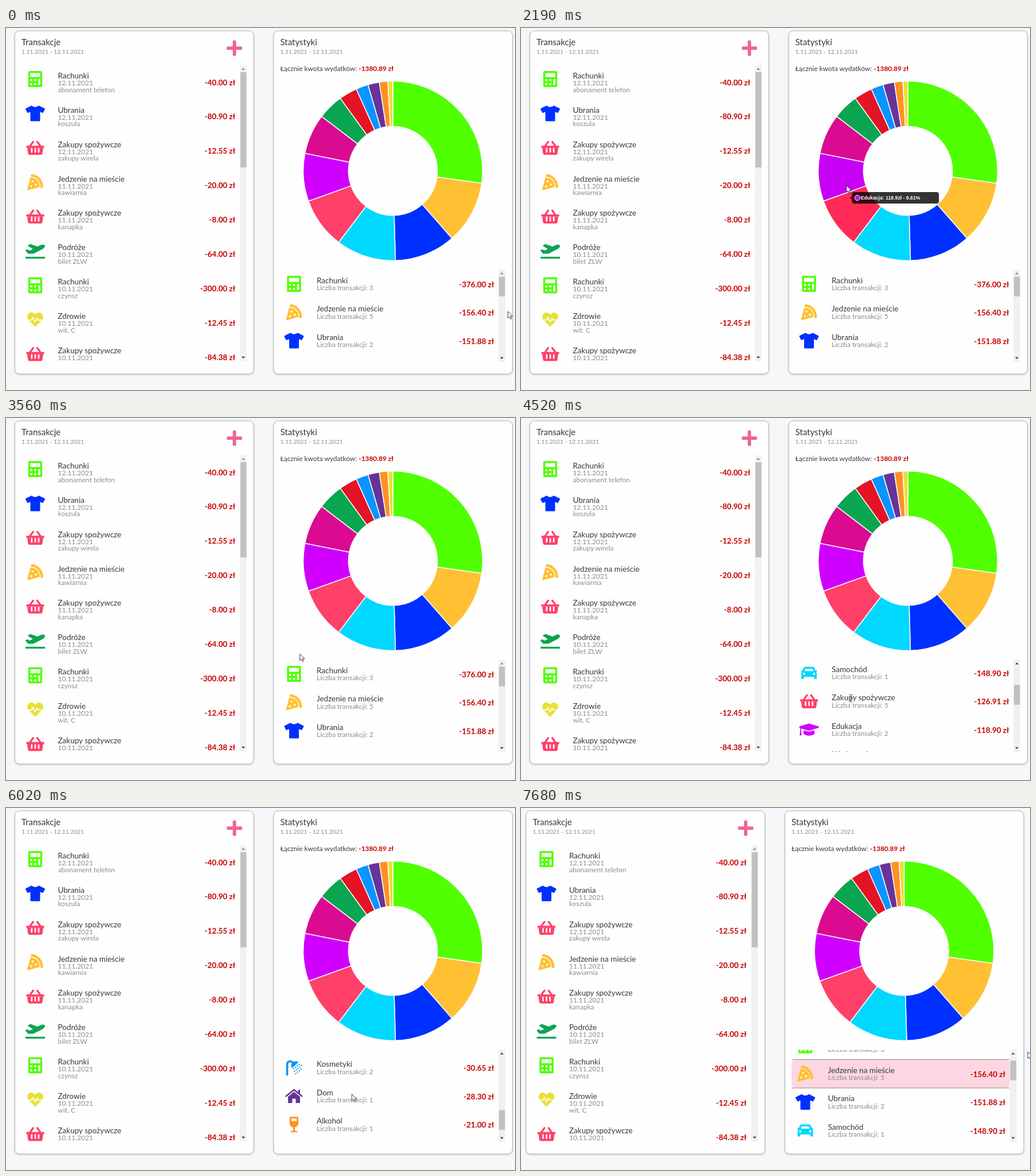
Recreate the animation shown at these times as an HTML page. Size 888 by 631 pixels, loop 8 s.

```html
<!DOCTYPE html>
<html lang="pl">
<head>
<meta charset="utf-8">
<title>Wydatki</title>
<style>
html, body { margin: 0; width: 100%; height: 100%; overflow: hidden; background: #f6f7f9; }
svg { display: block; font-family: Lato, sans-serif; }
.panel { fill: #fefefe; stroke: #b9b9b9; filter: drop-shadow(0 1px 1.5px rgba(0,0,0,.22)); }
.title { font-size: 15px; fill: #2f3a45; }
.range { font-size: 10.4px; fill: #8c8c8c; }
.name { font-size: 13.5px; fill: #2f3a45; }
.note { font-size: 12px; fill: #8c8c8c; }
.sum { font-size: 11.9px; fill: #2f3a45; }
.money { font-weight: 700; fill: #c80000; }
.amount { font-size: 13.5px; text-anchor: end; }
.tip { font: bold 8.7px "Liberation Sans", Arial, sans-serif; fill: #fff; }
.hole { fill: #fefefe; }
.cut { fill: none; stroke: #fefefe; }
.bar { fill: none; stroke: currentColor; stroke-linecap: round; }
</style>
</head>
<body>
<svg id="stage" width="888" height="631" viewBox="0 0 888 631"></svg>
<script>
// Icons are centred on 0,0 and take the colour of their category.
const icons = {
  bill: `<rect x="-12.2" y="-14" width="24.4" height="28" rx="2.6"/>
    <path class="hole" d="M-8.7-10.5H8.7V-3.5H-8.7ZM-8.7 0h3.5v3.5h-3.5ZM-1.7 0h3.5v3.5h-3.5ZM5.2 0h3.5v10.5h-3.5ZM-8.7 7h3.5v3.5h-3.5ZM-1.7 7h3.5v3.5h-3.5Z"/>`,
  pizza: `<path d="M-8.1-9.6L-7.3-12.7Q-6.8-14-5.3-14C4.6-13 12.9-5 14 7.7Q14 9.2 12.7 9.7L9.6 10.5C9.1-2.4 2.2-9.3-8.1-9.6Z"/>
    <path d="M-8.5-7.9C1.2-7.8 7.7-1.4 7.9 8.2L-12.9 14Q-14.2 14-14 12.9Z"/>
    <g class="hole"><circle cx="-7" cy="7" r="1.8"/><circle cx="-4.4" cy="-1.3" r="1.8"/><circle cx="1.3" cy="4.4" r="1.8"/></g>`,
  shirt: `<path d="M-6.2-13.7C-3-10.4 3-10.4 6.2-13.7L16.6-8.6Q17.2-8 17-7.3L13.9-1.3Q13.3-.7 12.6-1L9.6-2.4Q8.6-2.6 8.5-1.6V12Q8.5 13.6 6.9 13.6H-6.9Q-8.5 13.6-8.5 12V-1.6Q-8.6-2.6-9.6-2.4L-12.6-1Q-13.3-.7-13.9-1.3L-17-7.3Q-17.2-8-16.6-8.6Z"/>`,
  car: `<path d="M-9.5-8.5Q-9-10.5-7-10.5H7Q9-10.5 9.5-8.5L11-4.5H13.5V-2L12.3-1.5Q13.5 0 13.5 1.5V10.5H8.7V7H-8.7V10.5H-13.5V1.5Q-13.5 0-12.3-1.5L-13.5-2V-4.5H-11Z"/>
    <path class="hole" d="M-6.3-7H6.3L7.6-3H-7.6Z"/><g class="hole"><circle cx="-8.7" cy="1.7" r="2"/><circle cx="8.7" cy="1.7" r="2"/></g>`,
  basket: `<rect x="-15.7" y="-3.5" width="31.4" height="3.5" rx="1.3"/>
    <path d="M-14-.2H14L12.6 10Q12 12.2 10 12.2H-10Q-12 12.2-12.6 10Z"/>
    <path class="bar" stroke-width="3.3" d="M-9-3L-3.6-10.4M9-3L3.6-10.4"/>
    <path class="cut" stroke-width="2.6" stroke-linecap="round" d="M-6.1 1.5V7.3M0 1.5V7.3M6.1 1.5V7.3"/>`,
  cap: `<path d="M0-10.6L16.5-5.7Q18-4.4 16.5-3.1L1.5 1.6Q0 2-1.5 1.6L-13.7-2V3.5L-12.7 10H-16.5L-15.4 3.5V-2.8L-16.5-3.1Q-18-4.4-16.5-5.7Z"/>
    <path d="M-9 1L-1.5 3.4Q0 3.8 1.5 3.4L9 1L9.8 7C6 11.6-6 11.6-9.8 7Z"/>`,
  ticket: `<path d="M-15-9H15V-3A3 3 0 0 0 15 3V9H-15V3A3 3 0 0 0-15-3Z"/><path class="cut" stroke-width="2" d="M-9-5H9V5H-9Z"/>`,
  plane: `<rect x="-17" y="10.2" width="34" height="3.4" rx=".8"/>
    <path d="M-12.8 4.5Q-12.2 5.1-11.5 5.1H-4.5Q-3.6 5.1-2.9 4.7L12.6-3.1Q15-4.4 16.2-6.2Q17.4-8.3 16.9-9.6Q16.2-11 13.8-11.1Q11.5-11.2 9.1-10.1L3.9-7.4L-7.8-11.8Q-8.3-12-8.7-11.8L-12.2-10Q-13.2-9.4-12.5-8.5L-4.2-3.3L-9.7-.5L-13.5-2.5Q-14-2.7-14.4-2.5L-16.5-1.4Q-17.4-.8-16.8 .1Z"/>`,
  film: `<rect x="-14" y="-11" width="28" height="22" rx="2.5"/><path class="hole" d="M-7-8H7V-1.5H-7ZM-7 1.5H7V8H-7Z"/>`,
  shower: `<path class="bar" stroke-width="3.6" stroke-linecap="butt" d="M-12 12V-6C-12-12-5-12.5-2-8.5"/>
    <path d="M-4.5-1C-7-8 0-13 6.5-10.5L7.5-9.3L-3.2 .6Z"/>
    <path class="bar" stroke-width="2.2" stroke-dasharray=".1 3.9" d="M-.5 2L10-7M1 6.5L14-5M3 10.5L14.5 .5"/>`,
  house: `<path class="bar" stroke-width="2.6" d="M-13.7 .2L0-11L13.7 .2"/><path d="M-10.5 1L0-7.5L10.5 1V12H3V4.5H-3V12H-10.5ZM7-11h3.5v7L7-7Z"/>`,
  glass: `<path d="M-7-13.5H7L7.8-3C7.8 2 4.5 4.2 1.6 4.8V11H4.5Q6 11 6 13.5H-6Q-6 11-4.5 11H-1.6V4.8C-4.5 4.2-7.8 2-7.8-3Z"/><path class="hole" d="M-4.4-10.5H4.4L4.7-6H-4.7Z"/>`,
  heart: `<path d="M0 12.3Q-.5 12.3-1 11.8L-12 .5C-14.6-3-14.4-7.2-12-9.9C-8.9-13-4.6-13-1.5-10.1L0-8.5L1.5-10.1C4.6-13 8.9-13 12-9.9C14.4-7.2 14.6-3 12 .5L1 11.8Q.5 12.3 0 12.3Z"/>
    <path class="cut" stroke-width="1.8" stroke-linejoin="round" d="M-14 .9H-6.1L-3.9-4L0 4L3.5-2.6L5.3 .9H14"/>`
};

// name, colour, icon, total, number of transactions, hover colour
const categories = [
  ['Rachunki', '#50ff00', 'bill', 376, 3],
  ['Jedzenie na mieście', '#ffc033', 'pizza', 156.4, 5],
  ['Ubrania', '#0030ff', 'shirt', 151.88, 2, '#002be6'],
  ['Samochód', '#00d8ff', 'car', 148.9, 1, '#00c2e6'],
  ['Zakupy spożywcze', '#ff4068', 'basket', 126.91, 5, '#ff1f4d'],
  ['Edukacja', '#d000ff', 'cap', 118.9, 2, '#bb00e6'],
  ['Wydarzenia', '#da0a91', 'ticket', 100, 1, '#c4007f'],
  ['Podróże', '#0aa550', 'plane', 64, 1],
  ['Rozrywka', '#e31425', 'film', 45.5, 1],
  ['Kosmetyki', '#0a94ff', 'shower', 30.65, 2],
  ['Dom', '#673399', 'house', 28.3, 1],
  ['Alkohol', '#ff9124', 'glass', 21, 1],
  ['Zdrowie', '#e8e037', 'heart', 12.45, 1]
];
const total = 1380.89;

// category, day, note, amount
const transactions = [
  [0, 12, 'abonament telefon', 40], [2, 12, 'koszula', 80.9], [4, 12, 'zakupy wirela', 12.55],
  [1, 11, 'kawiarnia', 20], [4, 11, 'kanapka', 8], [7, 10, 'bilet ZLW', 64],
  [0, 10, 'czynsz', 300], [12, 10, 'wit. C', 12.45], [4, 10, '', 84.38]
];

const text = (cls, x, y, s) => `<text class="${cls}" x="${x}" y="${y}">${s}</text>`;
const money = v => `-${v.toFixed(2)} zł`;
const amount = (x, y, v) => text('money amount', x, y, money(v));
const icon = (cat, x, y) =>
  `<g transform="translate(${x} ${y})" fill="${cat[1]}" color="${cat[1]}">${icons[cat[2]]}</g>`;

const panel = (x, title) => `<rect class="panel" x="${x + .5}" y="5" width="416.5" height="598" rx="8"/>
  ${text('title', x + 12, 30, title)}${text('range', x + 12, 44.5, '1.11.2021 - 12.11.2021')}`;

const scrollbar = (id, x, y, h, thumb) => `<rect x="${x}" y="${y}" width="12" height="${h}" fill="#f1f1f1"/>
  <path id="${id}Up" d="M${x + 3} ${y + 8}l3-3.4l3 3.4Z" fill="#8a8a8a"/>
  <path d="M${x + 3} ${y + h - 8.2}l3 3.4l3-3.4Z" fill="#404040"/>
  <rect id="${id}Thumb" x="${x + 1}" y="${y + 12}" width="10.5" height="${thumb}" fill="#c1c1c1"/>`;

const transactionRow = ([c, day, note, value], i) => {
  const y = 59.9 * i;
  return icon(categories[c], 51, 89 + y) + text('name', 90.5, 87.8 + y, categories[c][0]) +
    text('note', 90.5, 99.8 + y, `${day}.11.2021`) + text('note', 90.5, 111.5 + y, note) + amount(400, 99.5 + y, value);
};

const pitch = 49.5;
const categoryRow = (cat, i) => {
  const y = pitch * i;
  return icon(cat, 502.5, 446 + y) + text('name', 542, 444.8 + y, cat[0]) +
    text('note', 542, 457 + y, `Liczba transakcji: ${cat[4]}`) + amount(851.5, 451.5 + y, cat[3]);
};

const centre = { x: 675, y: 249 };
const polar = (r, a) => [centre.x + r * Math.sin(a), centre.y - r * Math.cos(a)];
let turn = 0;
const slices = categories.map(cat => {
  const from = turn, to = turn += cat[3] / total * 2 * Math.PI;
  const d = `M${polar(156.4, from)}A156.4 156.4 0 0 1 ${polar(156.4, to)}L${polar(77.6, to)}A77.6 77.6 0 0 0 ${polar(77.6, from)}Z`;
  return { d, mid: polar(117, (from + to) / 2) };
});
const slicePath = (i, fill, extra = '') =>
  `<path d="${slices[i].d}" fill="${fill}" stroke="#fefefe" stroke-width="1.5" ${extra}/>`;

const stage = document.getElementById('stage');
stage.innerHTML = `
<clipPath id="leftClip"><rect x="16" y="65" width="392" height="516.5"/></clipPath>
<clipPath id="rightClip"><rect x="468" y="421.5" width="391" height="160.5"/></clipPath>
<g id="page">
  ${panel(15, 'Transakcje')}
  <g fill="#f06292"><rect x="385.2" y="32.2" width="26.6" height="5.8" rx="1.6"/><rect x="395.6" y="21.8" width="5.8" height="26.6" rx="1.6"/></g>
  <g clip-path="url(#leftClip)">${transactions.map(transactionRow).join('')}</g>
  ${scrollbar('left', 408, 65, 516, 166)}
  ${panel(466.5, 'Statystyki')}
  <text class="sum" x="478.5" y="75">Łącznie kwota wydatków: <tspan class="money">${money(total)}</tspan></text>
  ${categories.map((cat, i) => slicePath(i, cat[1])).join('')}
  ${categories.map((cat, i) => cat[5] ? slicePath(i, cat[5], `id="hover${i}"`) : '').join('')}
  <g clip-path="url(#rightClip)"><g id="list">
    <g id="marks"></g>${categories.map(categoryRow).join('')}
  </g></g>
  ${scrollbar('right', 859, 421.5, 160.5, 34.3)}
  <g id="tip">
    <g fill="#000" fill-opacity=".8"><rect id="tipBox" y="-10" height="20" rx="4"/><path id="tipCaret"/></g>
    <circle id="tipDot" cx="9.3" r="4.6" stroke="#fff"/>
    <text id="tipText" class="tip" x="15.2" y="3"></text>
  </g>
</g>
<g id="cursor">
  <path id="arrow" d="M0 0V11.6L2.7 9.1L4.6 13.3L6.5 12.5L4.7 8.4H8.3Z" fill="#fff" stroke="#26263a" stroke-width=".9"/>
  <path id="beam" d="M-1-6Q1-6 1.5-5Q2-6 4-6M1.5-5V6M-1 7Q1 7 1.5 6Q2 7 4 7" fill="none" stroke="#333"/>
</g>`;
const $ = id => document.getElementById(id);
const set = (id, attrs) => { for (const k in attrs) $(id).setAttribute(k, attrs[k]); };

const clamp = v => Math.max(0, Math.min(1, v));
const mix = (a, b, p) => a + (b - a) * p;
const easeOut = p => 1 - (1 - clamp(p)) ** 4;

// Interpolates rows of [time, ...values].
function track(keys, t) {
  const next = keys.findIndex(k => k[0] > t);
  if (next < 0) return keys.at(-1).slice(1);
  const a = keys[Math.max(0, next - 1)], b = keys[next];
  const p = clamp((t - a[0]) / (b[0] - a[0] || 1));
  return a.slice(1).map((v, i) => mix(v, b[i + 1], p));
}

const cursorPath = [
  [0, 875.5, 494], [70, 875.5, 494], [250, 800, 455], [400, 745, 405], [620, 708, 398], [950, 708, 398],
  [1200, 672, 385], [1700, 628, 355], [1900, 600, 333], [2190, 568, 275], [2350, 556, 225], [2540, 552, 192],
  [2900, 556, 190], [3000, 552, 230], [3200, 530, 270], [3350, 491, 303], [3560, 512.5, 411], [3800, 555, 465],
  [4200, 574, 488], [5500, 574, 488], [5950, 595, 495], [6500, 660, 523], [6800, 690, 515], [7100, 740, 480],
  [7420, 850, 470], [7620, 850, 470], [7680, 884, 425]
];
const scrollPath = [
  [0, 0], [3780, 0], [4180, 70], [4520, 150], [5000, 300], [5420, 455], [5580, 482], [5950, 482],
  [6200, 330], [6500, 126], [6850, 32.5]
];
const pagePath = [[0, 0], [7080, 0], [7220, -6.5]];
// row and its highlight strength over time
const marks = [
  [9, [[0, 0], [5150, 0], [5250, .6], [5500, 0]]],
  [1, [[0, 0], [6950, 0], [7250, 1]]]
];
// time and slice under the cursor
const hovers = [[330, 2], [1150, 3], [1790, 4], [2148, 5], [2370, 6], [3000, 5], [3330, -1]];

const tips = categories.map((cat, i) => {
  const label = `${cat[0]}: ${cat[3]}zł - ${+(cat[3] / total * 100).toFixed(2)}%`;
  $('tipText').textContent = label;
  const w = $('tipText').getComputedTextLength() + 19;
  const [x, y] = slices[i].mid, onLeft = x < centre.x;
  return { label, w, y, onLeft, x: onLeft ? x + 5 : x - 5 - w };
});

function drawHover(t) {
  const index = hovers.findLastIndex(h => h[0] <= t);
  const [start, current] = hovers[index] || [0, -1];
  const previous = index > 0 ? hovers[index - 1][1] : -1;
  const p = easeOut((t - start) / 400);
  categories.forEach((cat, i) => {
    if (cat[5]) set('hover' + i, { opacity: i === current ? p : i === previous ? 1 - p : 0 });
  });

  const shown = current < 0 ? previous : current;
  const fade = clamp((t - start) / 200);
  set('tip', { opacity: shown < 0 ? 0 : current < 0 ? 1 - fade : previous < 0 ? fade : 1 });
  if (shown < 0) return;
  const to = tips[shown], from = current >= 0 && previous >= 0 ? tips[previous] : to;
  const w = mix(from.w, to.w, p);
  set('tip', { transform: `translate(${mix(from.x, to.x, p)} ${mix(from.y, to.y, p)})` });
  set('tipBox', { width: w });
  set('tipCaret', { d: to.onLeft ? 'M0-3.5L-3.5 0L0 3.5Z' : `M${w}-3.5l3.5 3.5l-3.5 3.5Z` });
  set('tipDot', { fill: categories[shown][1] });
  $('tipText').textContent = to.label;
}

function drawList(t) {
  const [scroll] = track(scrollPath, t);
  set('list', { transform: `translate(0 ${-scroll})` });
  set('rightThumb', { y: 433.5 + scroll / (pitch * categories.length) * 136.5 });
  set('rightUp', { fill: scroll ? '#404040' : '#8a8a8a' });
  $('marks').innerHTML = marks.map(([row, keys]) => {
    const [p] = track(keys, t), y = 421.5 + pitch * row;
    const lines = p > .9 ? `<path d="M478.5 ${y}H859M478.5 ${y + pitch}H859" stroke="#8f8a8d"/>` : '';
    return `<rect x="478.5" y="${y}" width="381" height="${pitch}" rx="8" fill="#fcd6e0" opacity="${p}"/>${lines}`;
  }).join('');
}

function draw(t) {
  set('page', { transform: `translate(${track(pagePath, t)} 0)` });
  drawHover(t);
  drawList(t);
  const overText = t > 4200 && t < 4750;
  set('cursor', { transform: `translate(${track(cursorPath, t).join(' ')})` });
  set('arrow', { opacity: overText ? 0 : 1 });
  set('beam', { opacity: overText ? 1 : 0 });
}

function frame() {
  draw(performance.now() % 8000);
  requestAnimationFrame(frame);
}
frame();
</script>
</body>
</html>
```
